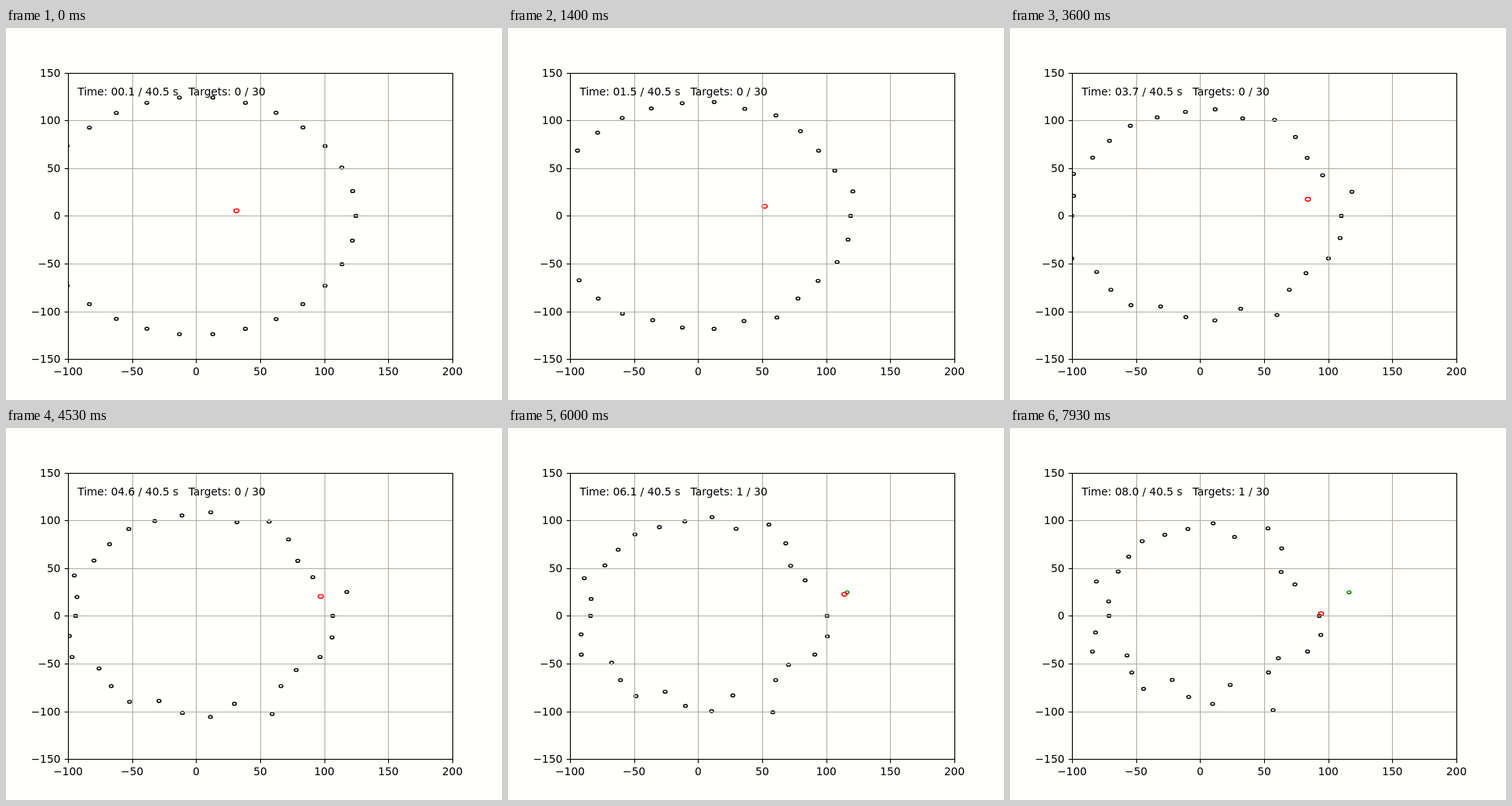
Animation, 640 px wide and 480 px high, one loop 8 s. Source, as an HTML page with a canvas:

```html
<!DOCTYPE html>
<html>
<head>
<meta charset="utf-8">
<style>
  html, body { margin: 0; width: 100%; height: 100%; overflow: hidden; background: #fffffc; }
  canvas { display: block; }
</style>
</head>
<body>
<canvas id="stage" width="640" height="480"></canvas>
<script>
const ctx = document.getElementById('stage').getContext('2d');
const LOOP = 8000, RADIUS = 125, AGENT_SPEED = 15;
const HIT = { target: 1, time: 5.9 };
const START = [30, 5];

// Inward speed of each target, counter-clockwise from the right.
const speeds = [
  4, 1.04, 5.5, 5.86, 3.74, 2.39, 4.76, 3.45, 4.19, 4.47,
  4.33, 5.21, 5.75, 4.55, 6.5, 6.73, 5.19, 4.13, 6.81, 5.65,
  4.59, 6.81, 4.95, 4.04, 6.12, 1.38, 5.66, 6.19, 4.15, 3.59
];

const toX = x => 80 + (x + 100) * 496 / 300;
const toY = y => 57.6 + (150 - y) * 369.6 / 300;
const snap = v => Math.round(v) + 0.5;
const range = (from, to) => Array.from({ length: (to - from) / 50 + 1 }, (_, i) => from + i * 50);
const xs = range(-100, 200), ys = range(-150, 150);
const left = snap(toX(-100)), right = snap(toX(200));
const top_ = snap(toY(150)), bottom = snap(toY(-150));

function line(x1, y1, x2, y2) {
  ctx.beginPath();
  ctx.moveTo(x1, y1);
  ctx.lineTo(x2, y2);
  ctx.stroke();
}

function ring([x, y], r, color) {
  ctx.strokeStyle = color;
  ctx.lineWidth = 1.39;
  ctx.beginPath();
  ctx.ellipse(toX(x), toY(y), r * 496 / 300, r * 369.6 / 300, 0, 0, 2 * Math.PI);
  ctx.stroke();
}

function text(s, x, y, align) {
  ctx.textAlign = align;
  ctx.fillText(String(s).replace('-', '\u2212'), x, y);
}

function targetAt(k, t) {
  const time = k === HIT.target ? Math.min(t, HIT.time) : t;
  const r = RADIUS - speeds[k] * time, a = k * Math.PI / 15;
  return [r * Math.cos(a), r * Math.sin(a)];
}

function advance(from, to, distance) {
  const dx = to[0] - from[0], dy = to[1] - from[1], d = Math.hypot(dx, dy);
  return [from[0] + dx / d * distance, from[1] + dy / d * distance];
}

function agentAt(t) {
  const first = targetAt(HIT.target, HIT.time);
  return t <= HIT.time
    ? advance(START, first, AGENT_SPEED * t)
    : advance(first, [92.2, 0], AGENT_SPEED * (t - HIT.time));
}

function drawAxes() {
  ctx.lineWidth = 1.11;
  ctx.strokeStyle = '#b0b0a0';
  for (const x of xs) line(snap(toX(x)), top_, snap(toX(x)), bottom);
  for (const y of ys) line(left, snap(toY(y)), right, snap(toY(y)));

  ctx.strokeStyle = '#000';
  ctx.strokeRect(left, top_, right - left, bottom - top_);
  for (const x of xs) {
    line(snap(toX(x)), bottom, snap(toX(x)), bottom + 4.86);
    text(x, toX(x), 448, 'center');
  }
  for (const y of ys) {
    line(left, snap(toY(y)), left - 4.86, snap(toY(y)));
    text(y, 70.3, Math.round(toY(y)) + 5, 'right');
  }
}

function draw(t) {
  const hit = t > HIT.time - 0.01;
  ctx.fillStyle = '#fffffc';
  ctx.fillRect(0, 0, 640, 480);
  ctx.fillStyle = '#000';
  ctx.font = '13.89px "DejaVu Sans", sans-serif';

  ctx.save();
  ctx.beginPath();
  ctx.rect(80, 57.6, 496, 369.6);
  ctx.clip();
  speeds.forEach((_, k) => ring(targetAt(k, t), 1.5, hit && k === HIT.target ? '#008000' : '#000'));
  ring(agentAt(t), 2, '#f00');
  ctx.restore();

  drawAxes();
  const clock = t.toFixed(1).padStart(4, '0');
  text(`Time: ${clock} / 40.5 s   Targets: ${hit ? 1 : 0} / 30`, 92.4, 87, 'left');
}

// Steps alternate between 130 and 70 ms; each advances the clock by 0.1 s.
function frame() {
  const ms = performance.now() % LOOP;
  const step = 2 * Math.floor(ms / 200) + (ms % 200 >= 130 ? 1 : 0);
  draw((step + 1) / 10);
  requestAnimationFrame(frame);
}
frame();
</script>
</body>
</html>
```
